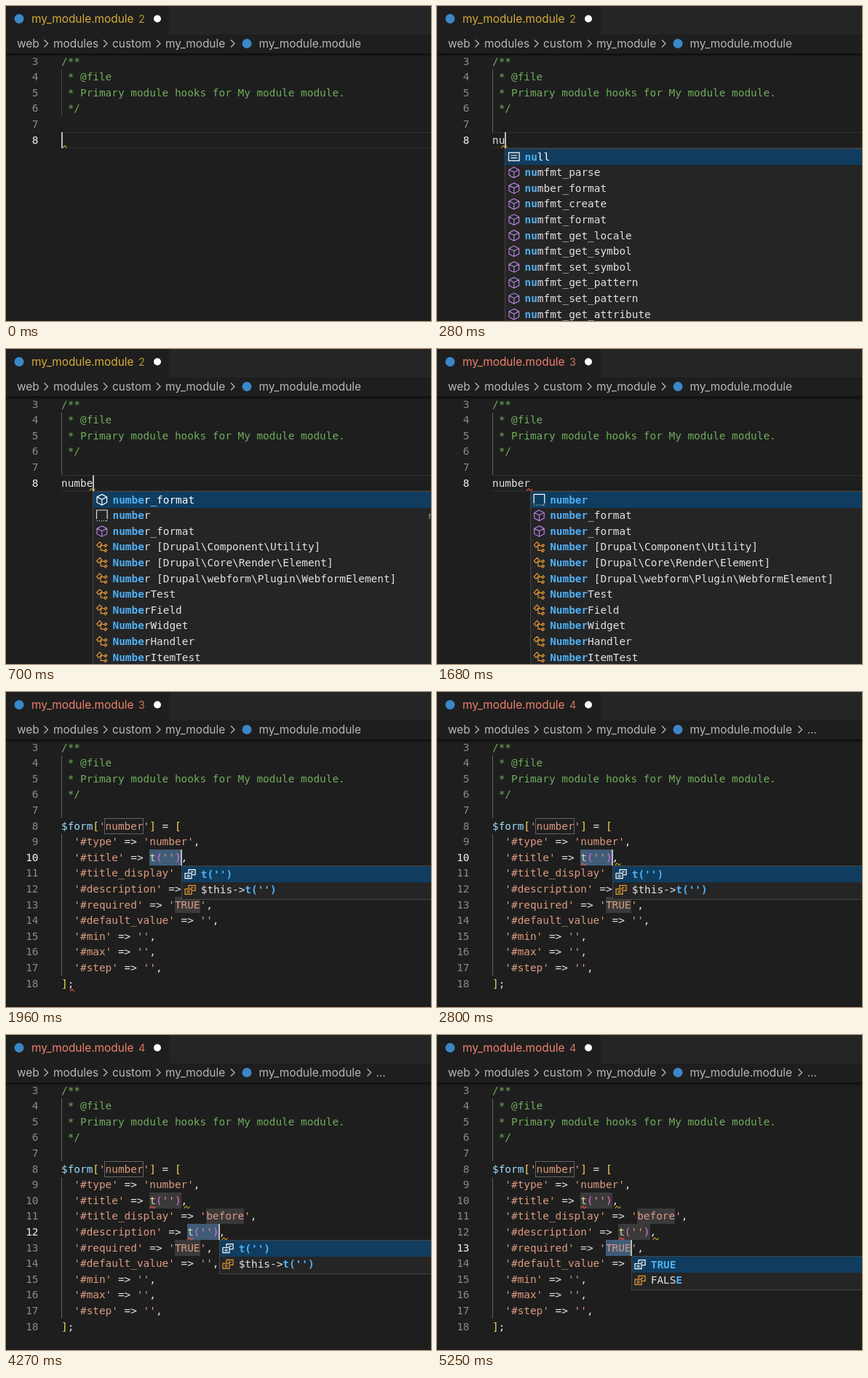
An HTML page with a canvas that plays this animation: 584x432 px, repeating every 5.67 s.

```html
<!DOCTYPE html>
<html lang="en">
<head>
<meta charset="utf-8">
<title>Editor snippet completion</title>
<style>
  html, body { margin: 0; height: 100%; overflow: hidden; background: #1e1e1e; }
  canvas { display: block; }
</style>
</head>
<body>
<canvas id="stage" width="584" height="432"></canvas>
<script>
const ctx = document.getElementById('stage').getContext('2d');
const W = 584, H = 432, LOOP = 5670;
const CHAR = 8.66, ROW = 21.6, LEFT = 76;
const MONO = '14.4px "DejaVu Sans Mono", monospace';
const SANS = '15.4px Inter, sans-serif';
const TEXT = '#e2e2e2', YELLOW = '#d5ac35', RED = '#f0806c', ERROR = '#e5503f', WARNING = '#c39a25', ORANGE = '#e59a35';

const colX = col => LEFT + col * CHAR;
const lineY = line => 173 + (line - 8) * ROW;

const header = ['/**', ' * @file', ' * Primary module hooks for My module module.', ' */'];
const snippet = [
  "$form['number'] = [", "  '#type' => 'number',", "  '#title' => t(''),",
  "  '#title_display' => 'before',", "  '#description' => t(''),", "  '#required' => 'TRUE',",
  "  '#default_value' => '',", "  '#min' => '',", "  '#max' => '',", "  '#step' => '',", '];'
];
const tokenColor = {
  "'": '#dc9a80', $: '#9cdcfe', t: '#dcdcaa', '(': '#da70d6', ')': '#da70d6', '[': '#f5d75a', ']': '#f5d75a'
};

// Tab stops of the snippet, with the time each becomes active and shows its list
const stops = [
  { line: 10, col: 14, word: "t('')", at: 1820, list: 1890, items: ["t('')", "$this->t('')"] },
  { line: 11, col: 23, word: 'before', at: 3290, list: 3360, items: ['before', 'after', 'invisible', 'attribute'] },
  { line: 12, col: 20, word: "t('')", at: 4270, list: 4270, items: ["t('')", "$this->t('')"] },
  { line: 13, col: 18, word: 'TRUE', at: 5180, list: 5250, items: ['TRUE', 'FALSE'] }
];
const cursorOff = [[1330, 1820], [2310, 2800], [3780, 4270], [4760, 5180]];

const icons = {
  cube: 'M8 .7L14.8 4.2V11.8L8 15.3 1.2 11.8V4.2ZM1.2 4.2L8 7.6 14.8 4.2M8 7.6V15.3',
  keyword: 'M.7 2.5H15.3V13.5H.7ZM3.5 6.3H12.5M3.5 9.7H12.5',
  snippet: 'M.7 13V.7H15.3V13M1 15.3H2M4 15.3H5M7 15.3H8M10 15.3H11M13 15.3H15',
  type: 'M.8 5.6L5 1.2 8 4.2 3.8 8.6ZM6.5 6H11M6.5 6V12.7H11M11 6.2L13.4 4.2 15 5.8 12.8 8ZM11 13L13.4 11 15 12.6 12.8 14.8Z',
  value: 'M6 6V2H15V9H11M1 6.8H10V14H1ZM3.5 9.3H7.5M3.5 11.5H7.5M9 5H12.5'
};
for (const name in icons) icons[name] = new Path2D(icons[name]);
const iconColor = { cube: '#b180d7', keyword: TEXT, snippet: TEXT, type: ORANGE, value: ORANGE };

const cubes = names => names.split(' ').map(name => ['cube', name]);
const functions = cubes('numfmt_parse number_format numfmt_create numfmt_format numfmt_get_locale ' +
  'numfmt_get_symbol numfmt_set_symbol numfmt_get_pattern numfmt_set_pattern numfmt_get_attribute numfmt_set_attribute');
const types = ['Number [Drupal\\Component\\Utility]', 'Number [Drupal\\Core\\Render\\Element]',
  'Number [Drupal\\webform\\Plugin\\WebformElement]', 'NumberTest', 'NumberField', 'NumberWidget',
  'NumberHandler', 'NumberItemTest'].map(name => ['type', name]);
const format = ['cube', 'number_format'], numberSnippet = ['snippet', 'number'];

function typedItems(length, t) {
  if (length < 3) return [['keyword', 'null'], ...functions];
  if (length === 3) return functions;
  return t < 910 ? [format, numberSnippet, format, ...types] : [numberSnippet, format, format, ...types];
}

// Boxes sit on whole pixels so that their edges stay crisp
function box(x, y, w, h, color) {
  const left = Math.round(x), top = Math.round(y);
  ctx.fillStyle = color;
  ctx.fillRect(left, top, Math.round(x + w) - left, Math.round(y + h) - top);
}

function label(text, x, y, color, font = SANS) {
  ctx.font = font;
  ctx.fillStyle = color;
  ctx.fillText(text, x, y);
}

// Monospaced text on the character grid; isBold picks the emphasised letters
function mono(text, x, top, color, isBold = () => false) {
  [...text].forEach((char, i) => {
    const bold = isBold(i);
    label(char, x + i * CHAR, top + 15.6, bold ? '#4fb0f5' : color, (bold ? 'bold ' : '') + MONO);
  });
}

function stroke(path, color, width = 1.2) {
  ctx.strokeStyle = color;
  ctx.lineWidth = width;
  ctx.stroke(path);
}

function squiggle(x, line, color, width = 8) {
  const path = new Path2D();
  for (let i = 0; i <= width; i += .5) path.lineTo(x + i, lineY(line) + 20 + 1.3 * Math.cos(i * 1.1));
  stroke(path, color, 1.2);
}

function dot(x, y, r, color) {
  ctx.fillStyle = color;
  ctx.beginPath();
  ctx.arc(x, y, r, 0, 7);
  ctx.fill();
}

function matchedLetters(word, pattern) {
  const lower = word.toLowerCase(), query = pattern.toLowerCase(), found = new Set();
  const start = lower.indexOf(query);
  if (start >= 0) return new Set([...query].map((_, i) => start + i));
  let from = 0;
  for (const char of query) {
    const i = lower.indexOf(char, from);
    if (i >= 0) { found.add(i); from = i + 1; } else if (found.size) break;
  }
  return found;
}

function popup(x, line, items, pattern) {
  const top = Math.round(lineY(line + 1));
  box(x, top, W, items.length * ROW + 4, '#454545');
  box(x + 1, top + 1, W, items.length * ROW + 2, '#252526');
  box(x + 1, top + 1, W, ROW, '#103d5f');
  items.forEach(([icon, name], i) => {
    const y = top + 1 + i * ROW, found = matchedLetters(name, pattern);
    ctx.save();
    ctx.translate(x + 4.5, y + 2.7);
    stroke(icons[icon], i ? iconColor[icon] : '#fff');
    ctx.restore();
    mono(name, x + 27.2, y, i ? TEXT : '#fff', k => found.has(k));
    if (icon === 'snippet') label('render element', x + 460, y + 15.5, '#a0a0a0', '12.5px "DejaVu Sans Mono", monospace');
  });
}

function drawHeader(t) {
  box(0, 0, W, 66, '#1e1e1e');
  box(225, 0, W, 39, '#252526');
  const color = t < 1610 ? YELLOW : RED;
  dot(18, 17.5, 6.5, '#3b87c8');
  label('my_module.module', 35, 22.7, color);
  ctx.globalAlpha = .85;
  label(t < 1610 ? '2' : t < 2590 ? '3' : '4', 182, 22.7, color, '14.5px Inter, sans-serif');
  ctx.globalAlpha = 1;
  dot(208, 17.5, 5, '#fff');

  const crumbs = [['web', 15], ['modules', 65], ['custom', 146], ['my_module', 219], ['my_module.module', 347.5]];
  const arrows = [52.5, 134, 207, 309];
  if (t >= 2170) {
    crumbs.push(['...', 508.5]);
    arrows.push(496.5);
  }
  for (const [text, x] of crumbs) label(text, x, 56.7, '#b8b8b8');
  for (const x of arrows) stroke(new Path2D(`M${x} 46.5l5 5-5 5`), '#b8b8b8', 1.3);
  dot(331, 51.5, 6.5, '#3b87c8');
  const shade = ctx.createLinearGradient(0, 65, 0, 70);
  shade.addColorStop(0, 'rgba(0,0,0,.6)');
  shade.addColorStop(1, 'rgba(0,0,0,0)');
  box(0, 65, W, 5, shade);
}

function drawLineNumbers(last, active) {
  for (let n = 3; n <= last; n++) {
    mono(String(n), 44.5 - String(n).length * CHAR, lineY(n), n === active ? '#f4f4f4' : '#8a8a8a');
  }
}

function drawCursor(x, line, t) {
  if (!cursorOff.some(([from, to]) => t >= from && t < to)) box(x - .3, lineY(line), 2, 21.5, '#bcbcba');
}

function drawTyping(t) {
  const typedAt = time => 'number'.slice(0, Math.max(0, Math.floor((time + 70) / 140)));
  const typed = typedAt(t), shown = typedAt(t - 70);
  const x = colX(typed.length);
  box(LEFT, lineY(8), W, 1, '#303030');
  box(LEFT, lineY(9) - 1, W, 1, '#303030');
  drawLineNumbers(8, 8);
  mono(typed, LEFT, lineY(8), TEXT);
  squiggle(typed ? x - 5 : x + 2, 8, t < 1680 ? WARNING : ERROR, typed ? 8 : 6);
  drawCursor(x, 8, t);
  if (shown) popup(colX(shown.length), 8, typedItems(shown.length, t), typed);
}

function drawSnippet(t) {
  const active = stops.filter(stop => t >= stop.at).pop();
  const end = colX(active.col + active.word.length);
  drawLineNumbers(18, active.line);
  box(LEFT, lineY(9), 1, 9 * ROW, '#606060');
  for (const stop of stops) {
    const area = [colX(stop.col), lineY(stop.line), stop.word.length * CHAR, ROW];
    if (stop === active) box(...area, '#264f78');
    box(...area, 'rgba(124,124,124,.3)');
  }
  ctx.strokeStyle = '#626262';
  ctx.lineWidth = 1;
  ctx.strokeRect(135.5, 173.5, 53, 21);
  snippet.forEach((text, i) => {
    for (const { 0: token, index } of text.matchAll(/'[^']*'|\$\w+|\S/g)) {
      mono(token, colX(index), lineY(8 + i), tokenColor[token[0]] || TEXT);
    }
  });
  if (t < 2590) squiggle(88, 18, ERROR, 6);
  else for (const stop of [stops[0], stops[2]]) {
    squiggle(colX(stop.col), stop.line, ERROR);
    squiggle(colX(stop.col + 5) + 4, stop.line, WARNING);
  }
  drawCursor(end, active.line, t);
  if (t >= active.list) popup(end, active.line, active.items.map(item => ['value', item]), active.word);
}

function frame(now) {
  const t = now % LOOP;
  box(0, 0, W, H, '#1e1e1e');
  header.forEach((text, i) => mono(text, LEFT, lineY(3 + i), '#6fae5c'));
  box(LEFT, lineY(4), 1, (t < 70 ? 3 : 4) * ROW, t < 70 ? '#484848' : '#606060');
  if (t < 1820) drawTyping(t);
  else drawSnippet(t);
  drawHeader(t);
  requestAnimationFrame(frame);
}
requestAnimationFrame(frame);
</script>
</body>
</html>
```
